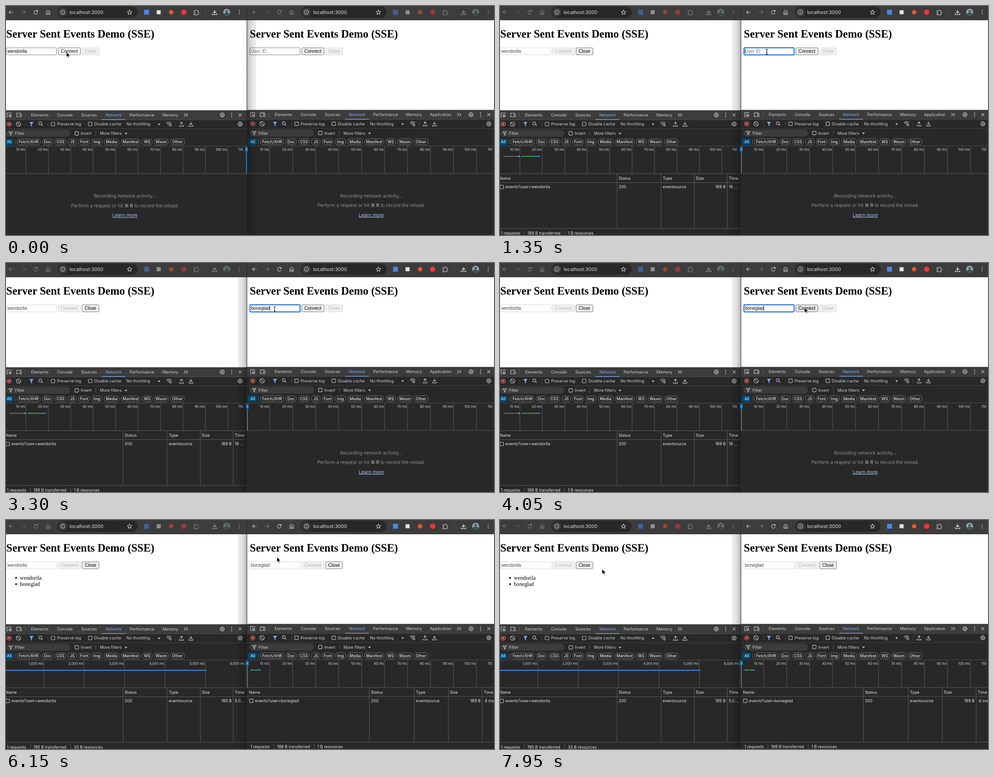
Animation, 1090 px wide and 514 px high, one loop 8 s. Source, as an HTML page:

```html
<!DOCTYPE html>
<html lang="en">
<head>
<meta charset="utf-8">
<title>Server Sent Events Demo</title>
<style>
  html, body { margin: 0; width: 100%; height: 100%; overflow: hidden; background: #282828; }
  svg { display: block; }
  text { white-space: pre; }
  .ui { font: 9.05px Inter, sans-serif; fill: #d0d0d0; }
  .url { font: 10.68px Inter, sans-serif; fill: #e3e3e3; }
  .chip { font: 500 8.7px Inter, sans-serif; fill: #e3e3e3; text-anchor: middle; }
  .tick { font: 7.6px Inter, sans-serif; fill: #d6d6d6; }
  .cell { font: 9.05px Inter, sans-serif; fill: #e6e6e6; }
  .hint { font: 10.35px Inter, "DejaVu Sans", sans-serif; fill: #919191; text-anchor: middle; }
  .hint tspan { font-weight: 700; }
  .link { fill: #a8c7fa; text-decoration: underline; }
  .title { font: bold 24.45px "Liberation Serif", serif; }
  .item { font: 12.2px "Liberation Serif", serif; }
  .field { font: 10.17px "Liberation Sans", Arial, sans-serif; }
  .mid { text-anchor: middle; }
  .end { text-anchor: end; }
  .ic { fill: none; stroke: #c7c7c7; stroke-width: 1.15; }
</style>
</head>
<body>
<svg id="stage" width="1090" height="514" viewBox="0 0 1090 514"></svg>
<script>
const LOOP = 8000, STEP = 150;
const NAMES = ['wendorila', 'boneglad'];
const LINE = '#5e5e5e', BLUE = '#4a8df0';

const text = (x, y, s, cls = 'ui', more = '') => `<text x="${x}" y="${y}" class="${cls}" ${more}>${s}</text>`;
const rect = (x, y, w, h, fill, more = '') => `<rect x="${x}" y="${y}" width="${w}" height="${h}" fill="${fill}" ${more}/>`;
const circle = (x, y, r, more = 'class="ic"') => `<circle cx="${x}" cy="${y}" r="${r}" ${more}/>`;
const icon = (d, x = 0, y = 0, more = '') => `<path class="ic" d="${d}" transform="translate(${x} ${y})" ${more}/>`;
const vline = (x, y, h, c = LINE) => rect(x - .5, y, 1, h, c);
const hline = (y, c = LINE) => rect(-6, y, 560, 1, c);
const group = (body, x = 0, y = 0, more = '') => `<g transform="translate(${x} ${y})" ${more}>${body}</g>`;
const dots = (x, y) => [-4, 0, 4].map(d => circle(x, y + d, 1.05, 'fill="#d0d0d0"')).join('');
const gear = (x, y) => circle(x, y, 3.9) + circle(x, y, 1.3) + circle(x, y, 5, 'class="ic" stroke-dasharray="1.9 2.03"');
const check = (x, y) => `<rect class="ic" x="${x - 4}" y="${y - 4}" width="8" height="8" rx="1.2" stroke-width="1"/>`;
const caret = (x, y) => `<path d="M${x - 3} ${y - 1.5}h6l-3 3.8z" fill="#c7c7c7"/>`;

// positions are local to each window
const WINS = [
  { x: 0, dy: 0, shift: 0, tools: [402, 483, 504, 523], tick: 44.5, gap: 50.1,
    cols: [261.5, 360, 434, 507.5], mid: 265.8, tabs: 6 },
  { x: 544, dy: -.6, shift: 12, tools: [468, 494.5, 516, 534.5], tick: 45.2, gap: 51.3,
    cols: [267.5, 368, 444, 519.5], mid: 271.8, tabs: 7 }
];
const TABS = [['Elements', 56], ['Console', 114], ['Sources', 168], ['Network', 222],
  ['Performance', 276], ['Memory', 349.5], ['Application', 403]];
const CHIPS = [['Fetch/XHR', 24, 77], ['Doc', 81, 105], ['CSS', 109, 134], ['JS', 138, 158], ['Font', 162, 187],
  ['Img', 191, 215], ['Media', 219, 253], ['Manifest', 257, 300], ['WS', 304, 327], ['Wasm', 331, 363], ['Other', 367, 399]];

function browserBar(w, i) {
  const nav = icon('M5 0H-4M0-4.2L-4.3 0 0 4.2', 11, 14) +
    icon('M-5 0H4M0-4.2L4.3 0 0 4.2', 39, 14, 'opacity=".45"') +
    icon('M3.6-2.2A4.2 4.2 0 1 0 4.2 1M4.2-5V-1.6H.8', 66.5, 14) +
    icon('M-4-1L0-4.8 4-1V4.8H1.2V1H-1.2V4.8H-4Z', 94, 14);
  const ext = rect(308.5, 8.5, 11, 11, '#4a86e8', 'rx="1"') +
    rect(336.5, 9.5, 9, 9, '#e3e3e3') +
    circle(369, 14, 5, 'fill="#e8562f"') + circle(397, 14, 6, 'fill="#e5393f"') +
    icon('M-5-3.5H-1.8A1.7 1.7 0 1 1 1.6-3.5H4V-.6A1.7 1.7 0 1 1 4 2.8V5.6H-5V2.8A1.8 1.8 0 1 0-5-.6Z', 425, 14) +
    vline(445.5, 8, 12, '#555') +
    icon('M0-5V2M-3.4-1.4L0 2 3.4-1.4M-5 2.6V5.4H5V2.6', 466, 14, 'style="stroke:#e3e3e3;stroke-width:1.4"') +
    circle(493, 14, 7.7, 'fill="#8fa9b3"') +
    '<path d="M486.6 18.2Q488 14.5 493 14.5T499.4 18.2A7.7 7.7 0 0 1 486.6 18.2Z" fill="#3f5650"/>' +
    circle(493, 11.7, 2.6, 'fill="#5a4c42"') + dots(521, 14);
  return rect(-6, 0, 560, 32, '#3c3c3c') + rect(115, 1, 179 + w.shift, 26, '#282828', 'rx="13"') +
    `<g id="nav${i}">${nav}${group(ext, w.shift)}</g>` +
    circle(127, 14, 10, 'fill="#3c3c3c"') + circle(127, 14, 4.7) + icon('M0-2.5V-1.3M0-.3V2.7', 127, 14) +
    text(142, 17.8, 'localhost:3000', 'url') +
    icon('M0-5L1.5-1.7 5-1.4 2.3 1 3.1 4.5 0 2.7-3.1 4.5-2.3 1-5-1.4-1.5-1.7Z', 276 + w.shift, 14);
}

function devtools(w) {
  const [more, cog, menu, close] = w.tools;
  let s = rect(-6, 234, 560, 21, '#3c3c3c') + rect(-6, 255, 560, 260, '#282828') +
    hline(234, '#474747') + hline(255, '#505050') + hline(275, '#454545');
  s += icon('M-1.5 4.5H-4.5V-4.5H4.5V-1.5M-.5-.5L4.8 1.2 2.3 2.3 1.2 4.8ZM2 2L5 5', 7, 244.5) +
    icon('M-5 4V-4H5M-6 4H0M2-1.5H5.5V4.2H2Z', 29, 244.5) + vline(43, 239, 11);
  for (const [name, x] of TABS.slice(0, w.tabs))
    s += text(x, 247.6, name, 'ui', name === 'Network' ? 'style="fill:#7cacf8"' : '');
  s += rect(213.5, 254.2, 53, 1.3, '#7cacf8') +
    icon('M-4.3-3.5L-.8 0-4.3 3.5M.5-3.5L4 0 .5 3.5', more, 244.5) +
    gear(cog, 244.5) + dots(menu, 244.5) + icon('M-3.3-3.3L3.3 3.3M3.3-3.3L-3.3 3.3', close, 244.5);

  s += circle(7, 265, 5, 'fill="none" stroke="#e46962" stroke-width="1.2"') + rect(4.6, 262.6, 4.8, 4.8, '#e46962', 'rx=".8"') +
    circle(28, 265, 5) + icon('M-3.5-3.5L3.5 3.5', 28, 265) + vline(44.5, 260, 11, '#484848') +
    '<path d="M52 260.5h9.5l-3.6 4.8v4.5h-2.2v-4.5z" fill="#7cacf8"/>' +
    circle(76.5, 263.7, 3.3) + icon('M2.2 2.2L5.8 5.8', 76.5, 263.2) + vline(94, 260, 11, '#484848') +
    check(105, 265) + text(114, 268.4, 'Preserve log') + check(188, 265) + text(197, 268.4, 'Disable cache') +
    text(269, 268.4, 'No throttling') + caret(342, 265.5) +
    icon('M-6-1.5Q0-7 6-1.5M-3.8 .8Q0-2.6 3.8 .6M-1.5 3L0 1.8', 364, 264.5) + circle(367.3, 267.8, 1.9) +
    vline(379, 260, 11, '#484848') +
    icon('M0 2.5V-4.5M-3-1.5L0-4.5 3-1.5M-4.5 2V4.8H4.5V2', 392, 265) +
    icon('M0-5V1.5M-3-1.5L0 1.5 3-1.5M-4.5 2V4.8H4.5V2', 413, 265) + gear(close, 265);

  s += rect(0, 278, 143.5, 15.5, '#3c3c3c', 'rx="7.5"') +
    icon('M-3.8-3.3H3.8L.8 .5V3.8H-.8V.5Z', 10.5, 285.8, 'stroke-width="1"') + text(20, 289.2, 'Filter') +
    check(158, 285.8) + text(167, 289.2, 'Invert') + vline(200.5, 280, 11) +
    text(209.7, 289.2, 'More filters') + caret(268, 286.2);
  s += rect(-4, 298, 20.5, 14, '#004a77', 'rx="5"') + text(7.2, 308.2, 'All', 'chip', 'style="fill:#c2e7ff"') + vline(20.5, 299, 12);
  for (const [name, a, b] of CHIPS)
    s += rect(a + .5, 298.5, b - a - 1, 13.2, 'none', `rx="5" stroke="#757575"`) + text((a + b) / 2, 308.2, name, 'chip');
  return s + hline(314, '#505050');
}

function network(w, n) {
  const long = n && n.long, gap = long ? 90.2 : w.gap, first = long ? 84.5 : w.tick;
  let s = '';
  for (let k = 0; k < (long ? 6 : 10); k++) {
    const x = first + k * gap;
    s += vline(x, 315, 61) + text(x - 1.6, 325.2, long ? `${k + 1},000 ms` : `${k + 1}0 ms`, 'tick end');
  }
  if (!long) s += text(first + 10 * gap - 26.8, 325.2, '110', 'tick');
  s += hline(376);
  if (!n) {
    return s + text(w.mid, 430.3, 'Recording network activity…', 'hint') +
      text(w.mid, 452, 'Perform a request or hit <tspan>⌘ R</tspan> to record the reload.', 'hint') +
      text(w.mid, 473.3, 'Learn more', 'hint link');
  }
  for (const [a, b, c] of n.bars) s += rect(a, 336.4, b - a, 2, c);
  const [c1, c2, c3, c4] = w.cols;
  s += text(-1.2, 390.2, 'Name', 'cell') + text(c1 + 3.5, 390.2, 'Status', 'cell') + text(c2 + 3.6, 390.2, 'Type', 'cell') +
    text(c3 + 3.2, 390.2, 'Size', 'cell') + text(c4 + 3.6, 390.2, 'Time', 'cell') + hline(396);
  for (const x of w.cols) s += vline(x, 377, 122);
  s += check(4, 406.2) + text(12.3, 409.3, 'events?user=' + n.user, 'cell') + text(c1 + 3.5, 409.3, '200', 'cell') +
    text(c2 + 3.6, 409.3, 'eventsource', 'cell') + text(c4 - 3.5, 409.3, n.size + ' B', 'cell end') +
    text(c4 + n.timeX, 409.3, n.time, 'cell');
  return s + hline(498.7) + text(2, 513, '1 requests', 'cell') + vline(54.5, 503, 11) +
    text(61.3, 513, n.size + ' B transferred', 'cell') + vline(144.5, 503, 11) + text(151.5, 513, n.res + ' B resources', 'cell');
}

function button(x, w, label, look) {
  const off = look === 'off';
  const fill = { off: '#f2f2f2', hover: '#e3e3e3', press: '#fafafa', on: '#efefef' }[look];
  return rect(x, 93.8, w, 15.9, fill, `rx="2.3" stroke="${off ? '#d4d4d4' : '#707070'}"`) +
    text(x + w / 2, 105, label, 'field mid', `fill="${off ? '#b3b3b3' : '#000'}"`);
}

function form(f) {
  const edge = f.open ? '#d4d4d4' : f.focus ? '#0a5fcf' : '#767676';
  const ink = f.open ? '#484848' : f.value ? '#000' : '#757575';
  return rect(.9, 93.8, 112, 15.9, '#fff', `rx="1.6" stroke="${edge}" stroke-width="${f.focus ? 1.9 : 1}"`) +
    text(3.2, 105, f.value || 'User ID', 'field value', `fill="${ink}"`) +
    button(116.6, 49.8, 'Connect', f.open ? 'off' : f.look) +
    button(169.8, 37.8, 'Close', f.open ? 'on' : 'off') +
    (f.focus ? rect(3, 96.5, .9, 10.5, '#000', 'class="bar"') : '');
}

const stage = document.getElementById('stage');
const clip = (id, x, w) => `<clipPath id="${id}"><rect x="${x}" width="${w}" height="514"/></clipPath>`;
const fade = (id, a, b) => `<linearGradient id="${id}" x1="${a}" x2="${b}"><stop stop-opacity=".27"/>` +
  '<stop offset=".45" stop-opacity=".13"/><stop offset="1" stop-opacity=".06"/></linearGradient>';
stage.innerHTML = `<defs>${clip('clip0', 0, 537.5)}${clip('clip1', 538.7, 552)}${fade('fade0', 1, 0)}${fade('fade1', 0, 1)}</defs>` +
  rect(0, 0, 1090, 514, '#2a2a2a') +
  WINS.map((w, i) => `<g clip-path="url(#clip${i})">` + group(
    rect(-6, 32, 560, 202, '#fff') + browserBar(w, i) +
    text(.6, 71, 'Server Sent Events Demo (SSE)', 'title') +
    `<g id="form${i}"></g><g id="list${i}"></g>` +
    group(devtools(w) + `<g id="net${i}"></g>`, 0, w.dy), w.x) + '</g>').join('') +
  rect(518, 32, 19.5, 482, 'url(#fade0)', 'id="shade0"') + rect(538.7, 32, 20.3, 482, 'url(#fade1)', 'id="shade1"') +
  `<g id="grip">${rect(0, 315, 1.7, 61, '#2f8fdc')}${rect(-2.6, 315, 6.6, 14, '#0b5c94', 'rx="2"')}${vline(-.2, 319, 6, '#a8c7fa')}${vline(1.8, 319, 6, '#a8c7fa')}</g>` +
  '<path id="arrow" d="M0 0V11.6L2.7 9.1 4.5 13.2 6.4 12.4 4.7 8.4H8.4Z" stroke="#fff" stroke-width=".8"/>' +
  '<path id="beam" d="M-2.6-6Q0-6 0-4.5Q0-6 2.6-6M0-4.5V4.8M-2.6 6Q0 6 0 4.5Q0 6 2.6 6M-1.4 2.2H1.4" fill="none" stroke="#000" stroke-width="1.1"/>';
const $ = id => document.getElementById(id);

// time, x, y of the pointer
const TRAIL = [[0, 135, 103], [450, 555, 114], [600, 603, 106], [900, 602, 104], [1050, 601, 103], [1200, 598, 103],
  [1350, 596, 103], [3300, 600, 104], [3450, 612, 105], [3600, 634, 104], [3750, 660, 101], [3900, 676, 100],
  [4050, 680, 100], [6150, 605, 83], [6300, 589, 87], [6600, 391, 87], [6900, 372, 92], [7050, 338, 102],
  [7200, 319, 106], [7650, 290, 110], [7800, 248, 110], [7950, 228, 110]];

const quickBars = [[7.5, 40, '#6b6b6b'], [40, 45, '#5cc8e8'], [48, 80, '#34a853'], [80, 90, BLUE]];
const shortBars = [[2, 4, '#6b6b6b'], [4, 7, '#5cc8e8'], [7.5, 18, '#34a853'], [18, 25, BLUE]];

function typed(t) {
  const n = t < 1950 ? 0 : t < 2250 ? 2 : 3 + Math.floor((t - 2250) / STEP);
  return NAMES[1].slice(0, n);
}

function leftNet(t) {
  if (t < 150) return null;
  return t < 5250
    ? { user: NAMES[0], size: 189, res: 1, time: '16 …', timeX: 3.6, bars: quickBars }
    : { user: NAMES[0], size: 195, res: 33, time: '5.0…', timeX: 3.6, bars: [[0, 447.5, BLUE]], long: true };
}

const last = {};
function put(id, html) {
  if (last[id] !== html) $(id).innerHTML = last[id] = html;
}

function render(t) {
  const front = t < 1350 ? 0 : 1, open = t >= 4650;
  put('form0', form({ value: NAMES[0], open: t >= 150, look: 'press' }));
  put('form1', form({ value: typed(t), open, focus: front === 1 && !open,
    look: t >= 4500 ? 'press' : t >= 3750 ? 'hover' : 'on' }));
  const bar = document.querySelector('#form1 .bar');
  if (bar) bar.setAttribute('x', 3.2 + (typed(t) ? document.querySelector('#form1 .value').getComputedTextLength() : 0));
  put('list0', t < 5100 ? '' : NAMES.map((name, k) =>
    circle(22.5, 130 + k * 14.1, 2, '') + text(31, 133.6 + k * 14.1, name, 'item')).join(''));
  put('net0', network(WINS[0], leftNet(t)));
  put('net1', network(WINS[1], open ? { user: NAMES[1], size: 189, res: 1, time: '4 ms', timeX: 5.5, bars: shortBars } : null));

  for (const i of [0, 1]) {
    $('nav' + i).setAttribute('opacity', i === front ? 1 : .5);
    $('shade' + i).setAttribute('visibility', i === front ? 'hidden' : 'visible');
  }
  $('grip').setAttribute('transform', `translate(${front ? 538.3 : 536.2} 0)`);

  const [, x, y] = TRAIL.filter(p => p[0] <= t).pop();
  const beam = t >= 1200 && t < 3750;
  for (const id of ['arrow', 'beam']) {
    $(id).setAttribute('transform', `translate(${x} ${y})`);
    $(id).setAttribute('visibility', (id === 'beam') === beam ? 'visible' : 'hidden');
  }
}

const start = performance.now();
let shown = -1;
function frame() {
  const t = Math.floor(((performance.now() - start) % LOOP) / STEP) * STEP;
  if (t !== shown) render(shown = t);
  requestAnimationFrame(frame);
}
frame();
</script>
</body>
</html>
```
